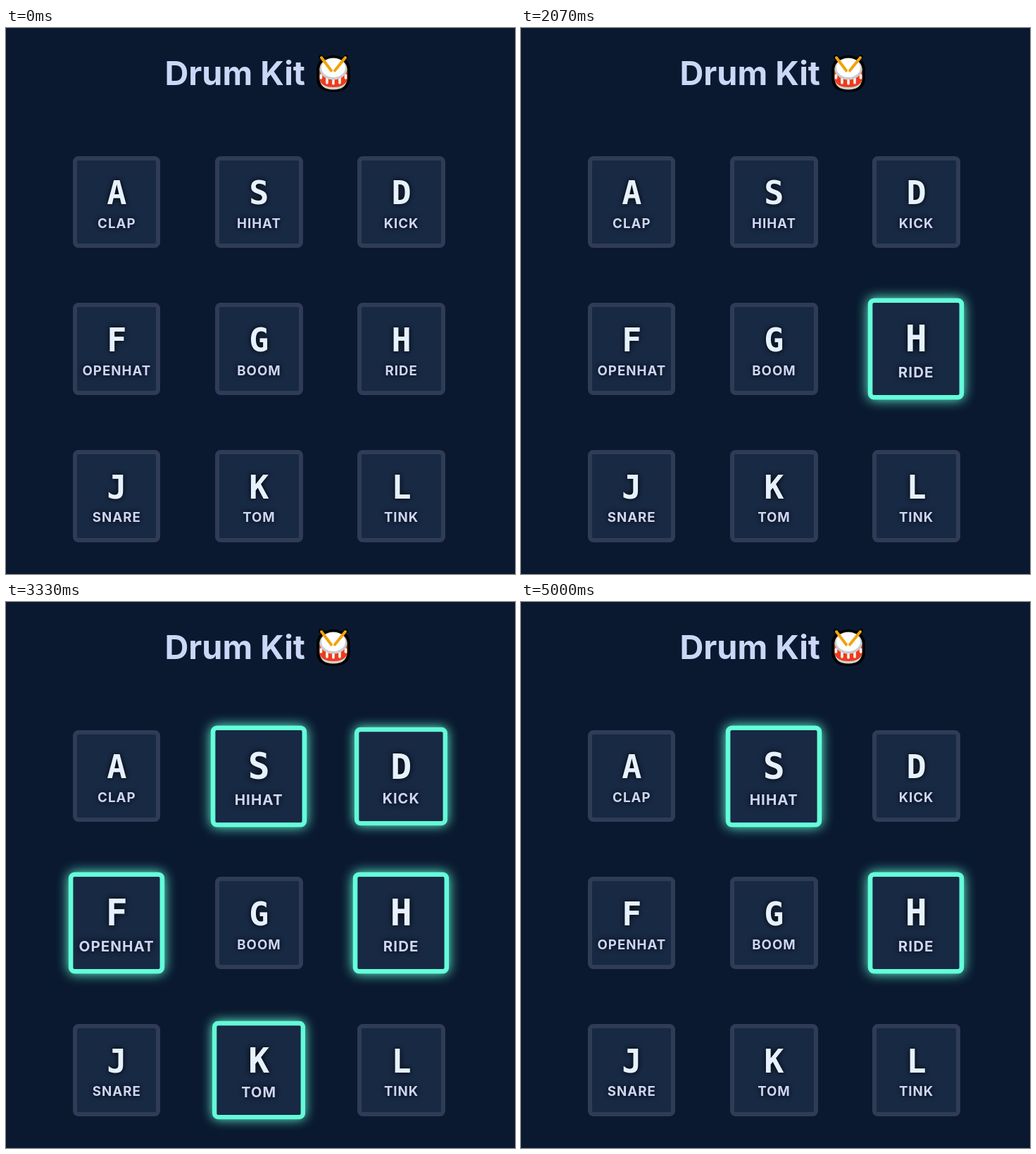
An HTML page for the animation above (5140 ms loop, 723x775 px).

```html
<!DOCTYPE html>
<html lang="en">
<head>
<meta charset="utf-8">
<title>Drum Kit</title>
<style>
  html, body { margin: 0; width: 100%; height: 100%; overflow: hidden; background: #0a192f; }
  #stage { position: relative; width: 723px; height: 775px; overflow: hidden; font-family: Inter, sans-serif; }
  svg { position: absolute; left: 0; top: 0; }
  .title { font: 700 46.8px Inter, sans-serif; fill: #ccd6f6; text-anchor: middle; }
  .key {
    position: absolute; box-sizing: border-box; width: 124.4px; height: 130.6px;
    border: 6px solid #303c55; border-radius: 7.8px; background: #182944;
    text-align: center; text-shadow: 0 0 7.8px #000; white-space: nowrap;
  }
  .key b, .key span { position: absolute; left: -20px; right: -20px; }
  .key b { top: 23.8px; font: 700 46.8px/46px "DejaVu Sans Mono", monospace; color: #e6f1ff; }
  .key span { top: 80.4px; font: 700 18.7px/20px Inter, sans-serif; letter-spacing: .975px; color: #ccd6f6; }
</style>
</head>
<body>
<div id="stage">
  <svg width="723" height="140" viewBox="0 0 723 140">
    <text class="title" x="325.2" y="81">Drum Kit</text>
    <g stroke-linecap="round" stroke-linejoin="round">
      <path d="M447 41 L452 46 Q465 37 478 46 L483 41 M444 57 V72 Q444 88 465 88 Q486 88 486 72 V57 Q484 43 465 43 Q446 43 444 57Z"
        fill="#000" stroke="#000" stroke-width="5.5"/>
      <path d="M445.5 57 V73 Q447 87.5 465 87.5 Q483 87.5 484.5 73 V57Z" fill="#d0d0d0"/>
      <path d="M445.5 62 V74 Q449 84 465 84 Q481 84 484.5 74 V62Z" fill="#ee3b1c"/>
      <path d="M447.5 67 V71 M456 71 V78 M465 73 V79 M474 71 V78 M482.5 67 V71" stroke="#f4f4f4" stroke-width="3.6"/>
      <ellipse cx="465" cy="58" rx="19.5" ry="15.5" fill="#cbcbcb"/>
      <ellipse cx="465" cy="56.5" rx="17" ry="13.5" fill="#fff"/>
      <path d="M448 42 L462 60.5 M482 42 L467 60.5" stroke="#f0a30a" stroke-width="4" fill="none"/>
    </g>
  </svg>
</div>
<script>
  const LOOP = 5140, START = 1400, END = 5000, STEP = 1000 / 15;
  const GROW = 170, TINT = 80, GLOW = 15.6;

  // letter, label, press times, time from which the key stays lit
  const KEYS = [
    ['A', 'CLAP', [1600, 2130, 2850, 3440, 4200, 4560]],
    ['S', 'HIHAT', [], 2200],
    ['D', 'KICK', [1480, 2471, 3269, 3593, 4060, 4440]],
    ['F', 'OPENHAT', [1336, 2638, 3163, 3960, 4655]],
    ['G', 'BOOM', [2180, 3869, 4380]],
    ['H', 'RIDE', [1169], 1780],
    ['J', 'SNARE', [1745, 2690, 3560, 4350]],
    ['K', 'TOM', [1560, 2350, 3269, 4130, 4620]],
    ['L', 'TINK', [1650, 2090, 2960, 3500, 4290, 4640]]
  ];

  // cubic-bezier(.25, .1, .25, 1)
  function ease(x) {
    if (x <= 0) return 0;
    if (x >= 1) return 1;
    let lo = 0, hi = 1, u;
    for (let i = 0; i < 20; i++) {
      u = (lo + hi) / 2;
      const v = 1 - u;
      if (0.75 * u * v + u * u * u < x) lo = u; else hi = u;
    }
    return 0.3 * u * (1 - u) ** 2 + 3 * u * u * (1 - u) + u ** 3;
  }

  function level(t, presses, stuck, dur) {
    let top = ease((t - stuck) / dur);
    for (const p of presses) {
      top = Math.max(top, ease((t - p) / dur) - ease((t - p - GROW) / dur));
    }
    return top;
  }

  const mix = (a, b, k) => Math.round(a + (b - a) * k);
  const stage = document.getElementById('stage');

  const keys = KEYS.map(([letter, label, presses, stuck = Infinity], i) => {
    const el = document.createElement('div');
    el.className = 'key';
    el.style.left = 95.1 + 202.15 * (i % 3) + 'px';
    el.style.top = 181.6 + 208.7 * Math.floor(i / 3) + 'px';
    el.innerHTML = `<b>${letter}</b><span>${label}</span>`;
    stage.append(el);
    return { el, presses, stuck };
  });

  // 15 pictures a second; the first one after the pause holds for two steps
  function sample(ms) {
    let n = Math.floor((ms + 3.4) / STEP);
    if (n === 22) n = 21;
    return Math.min(n * STEP, END);
  }

  function draw(ms) {
    const t = sample(ms), on = t >= START - 1;
    for (const { el, presses, stuck } of keys) {
      const size = on ? level(t, presses, stuck, GROW) : 0;
      const tint = on ? level(t, presses, stuck, TINT) : 0;
      el.style.transform = size > 0.001 ? `scale(${1 + 0.1 * size})` : 'none';
      el.style.borderColor = `rgb(${mix(48, 100, tint)},${mix(60, 255, tint)},${mix(85, 218, tint)})`;
      el.style.boxShadow = tint > 0.001 ? `0 0 ${GLOW * tint}px rgba(100,255,218,${tint})` : 'none';
    }
  }

  const t0 = performance.now();
  function tick() {
    draw((performance.now() - t0) % LOOP);
    requestAnimationFrame(tick);
  }
  tick();
</script>
</body>
</html>
```
